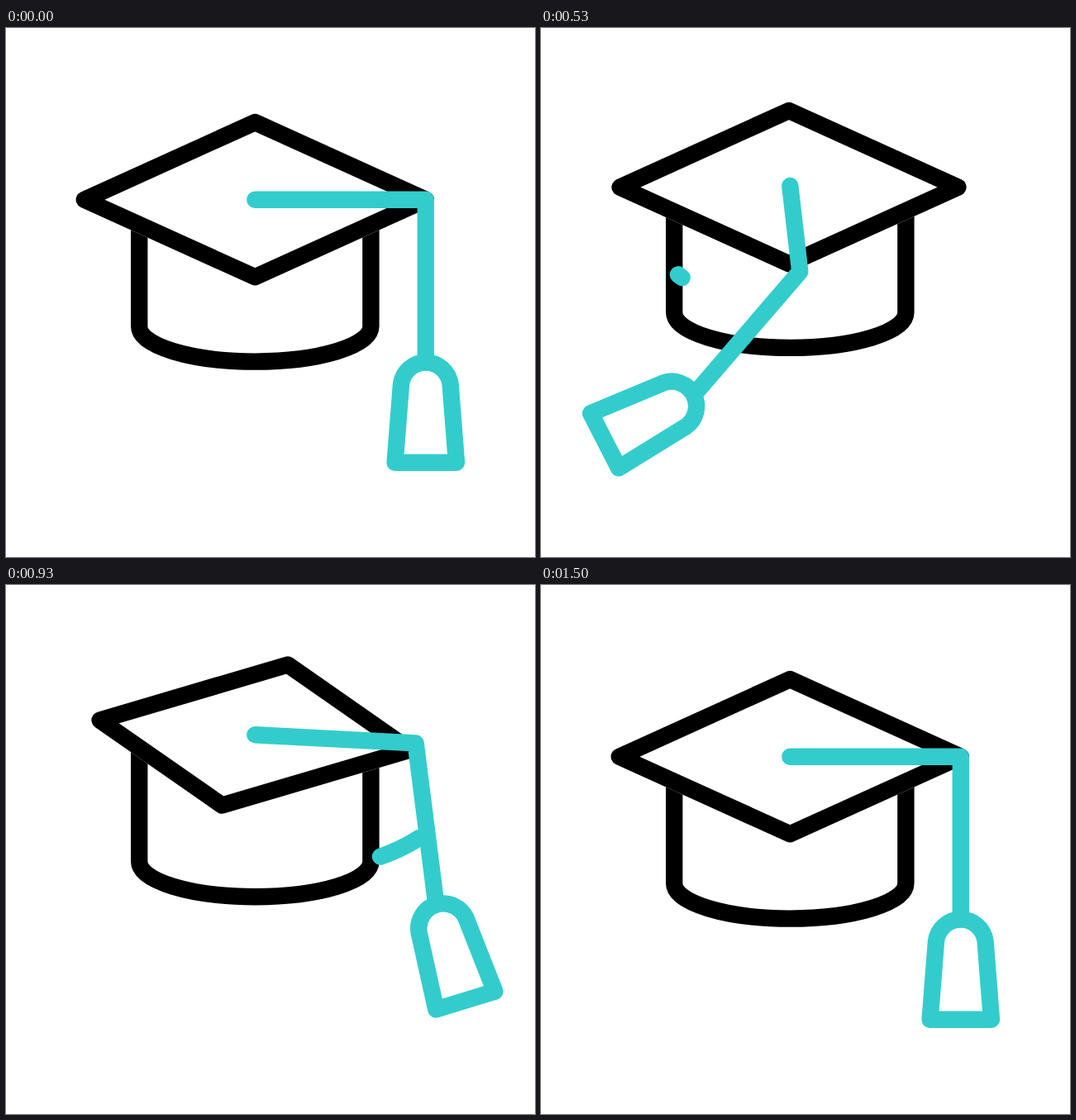
Recreate the animation shown at these times as an HTML page. Size 640 by 640 pixels, loop 1.67 s.

```html
<!DOCTYPE html>
<html lang="en">
<head>
<meta charset="utf-8">
<title>Graduation cap</title>
<style>
  html, body { margin: 0; width: 100%; height: 100%; overflow: hidden; background: #fff; }
  svg { display: block; width: 100vw; height: 100vh; }
  path { fill: none; stroke: #000; stroke-width: 20.4; stroke-linecap: round; stroke-linejoin: round; }
  .teal path { stroke: #33cccc; }
  #body { stroke-linecap: butt; }
  #mask { fill: #fff; stroke: #fff; }
</style>
</head>
<body>
<svg viewBox="0 0 640 640">
  <path id="body" d="M161.2 208V361A140.1 42.6 0 0 0 441.4 361V208"/>
  <path id="mask"/>
  <path id="board"/>
  <g class="teal">
    <path id="swoosh"/>
    <path id="string"/>
    <path id="tag" d="M-37.2 121.5L-29.8 27A30 30 0 0 1 29.8 27L37.2 121.5Z"/>
  </g>
</svg>
<script>
const LOOP = 1670, LAST = 45, TURN = 16, BACK = 31;
const CX = 301.3, CY = 207.7, RX = 206.5, RY = 93.6, CORD = 196.5;
const RAD = Math.PI / 180;
const el = id => document.getElementById(id);
const sin = deg => Math.sin(deg * RAD), cos = deg => Math.cos(deg * RAD);

const clamp = u => Math.max(0, Math.min(1, u));
const smooth = u => u * u * (3 - 2 * u);
// Softness above 0 flattens the ease, below 0 steepens it.
const ease = (u, soft) => smooth(u) + soft * (u - smooth(u));
const sweep = (n, start, end, bend = 1) =>
  smooth(clamp((n - start) / (end - start)) ** bend);

// Eased moves from rest: each one is [end step, end value, bend].
function moves(n, ...list) {
  let step = 0, value = 0;
  for (const [end, target, bend] of list) {
    value += (target - value) * sweep(n, step, end, bend);
    step = end;
  }
  return value;
}

const hops = n => moves(n, [8.6, -54], [20, -2], [32.6, -37], [LAST, 0]);
const cordAngle = n => moves(n, [4, -5.3], [TURN, 40.7], [26.8, -8], [33, 0]);
const tagAngle = n => moves(n, [4, -23.5], [17, 66, 1.5], [28, -17], [33, 0]);

const onEllipse = (x, y, rx, ry, deg) => [x + rx * cos(deg), y + ry * sin(deg)];
const line = pts => "M" + pts.map(p => p.map(v => v.toFixed(2)).join(" ")).join("L");

function arc(x, y, from, to) {
  if (Math.abs(to - from) < 1) return "";
  return line(Array.from({ length: 25 }, (_, i) =>
    onEllipse(x, y, 206, 108, from + (to - from) * i / 24)));
}

function swooshes(n) {
  const there = u => 38 + 113 * u, back = u => 148 - 111 * u;
  return arc(301, 201, there(sweep(n, 3.7, 15.2)), there(sweep(n, 0, 12.7, .8)))
    + arc(338, 239, back(sweep(n, 14.7, 32.5, 1.05)), back(sweep(n, 14.4, 29)));
}

// The square turns through an octagon, so it shrinks between its corners.
function boardPath(y, u) {
  const turn = 90 * u;
  const r = 1 - .01 * u - .01 * sin(2 * turn) - (.1 - .08 * u) * Math.abs(sin(4 * turn));
  return line([0, 90, 180, 270].map(q =>
    onEllipse(CX - 1.3 * u, y + 1.6 * u, RX * r, RY * r, turn + q))) + "Z";
}

function jointAt(y, u) {
  const r = 1 + .11 * u - .25 * Math.sqrt(u) * (1 - u) ** 1.5;
  return onEllipse(CX, y, RX * r, RY * r, 87 * u);
}

function draw(n) {
  const dy = hops(n), y = CY + dy;
  const phase = clamp(n < TURN ? n / TURN : (BACK - n) / (BACK - TURN));
  const board = boardPath(y, ease(phase, .3));
  const joint = jointAt(y, ease(phase, -.3));
  const cord = cordAngle(n);
  const end = [joint[0] - CORD * sin(cord), joint[1] + CORD * cos(cord)];

  el("body").setAttribute("transform", `translate(0 ${dy})`);
  el("mask").setAttribute("d", board);
  el("board").setAttribute("d", board);
  el("swoosh").setAttribute("d", swooshes(n));
  el("string").setAttribute("d", line([[CX, y], joint, end]));
  el("tag").setAttribute("transform", `translate(${end}) rotate(${tagAngle(n)})`);
}

function tick() {
  const t = performance.now() % LOOP;
  // 30 steps per second, on a 10 ms clock
  draw(Math.min(LAST, Math.floor(.3 * Math.floor(t / 10) + .15)));
  requestAnimationFrame(tick);
}
tick();
</script>
</body>
</html>
```
